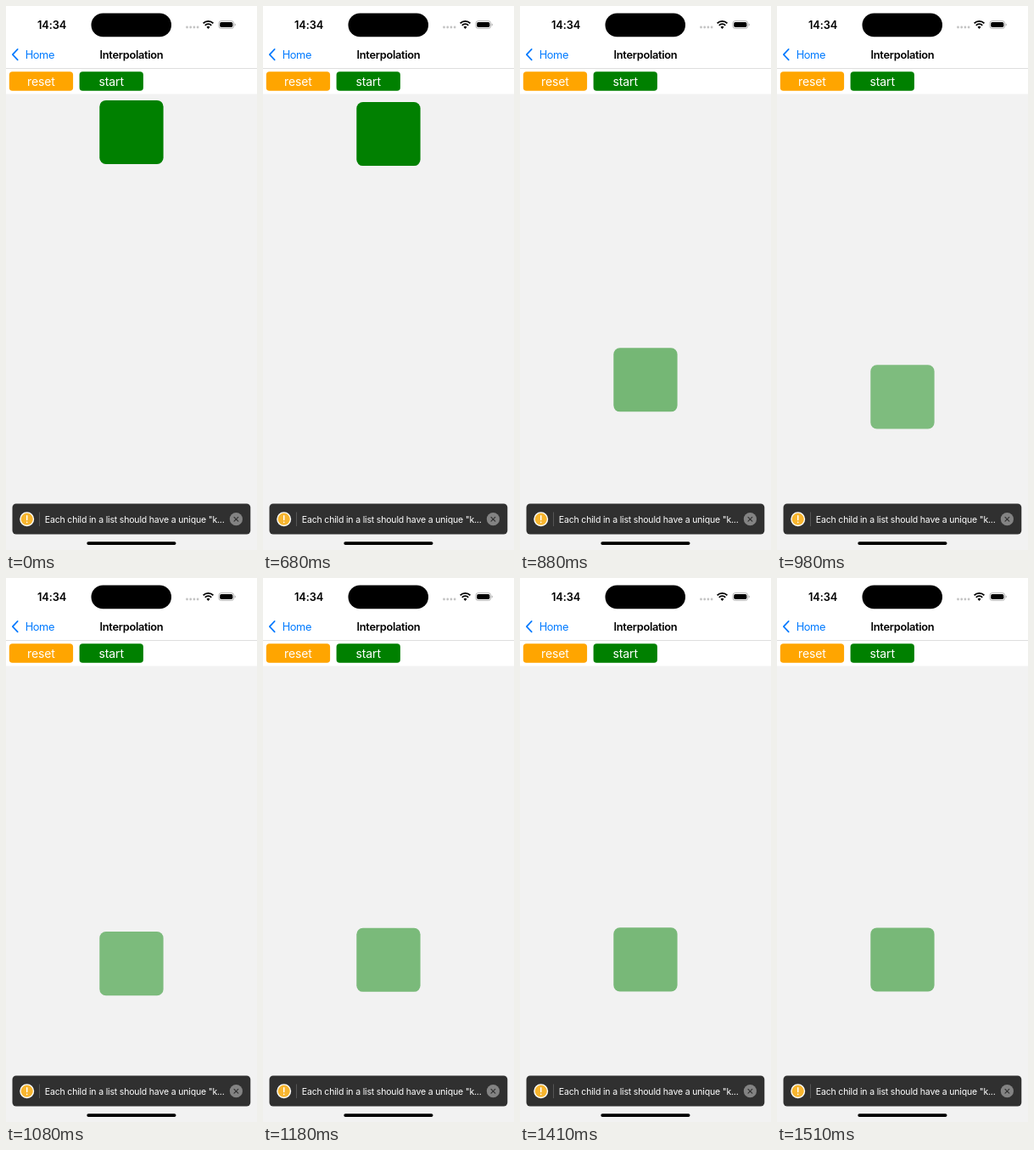
Write an HTML page that moves like this. It is 296 by 640 pixels and loops after 3050 ms.

```html
<!DOCTYPE html>
<html lang="en">
<head>
<meta charset="utf-8">
<title>Interpolation</title>
<style>
  html, body { margin: 0; width: 100%; height: 100%; overflow: hidden; background: #f2f2f2; }
  svg { display: block; width: 296px; height: 640px; }
  text { font-family: Inter, "Liberation Sans", sans-serif; }
  .time { font-size: 12.8px; font-weight: 600; letter-spacing: -.1px; }
  .title { font-size: 12.8px; font-weight: 600; letter-spacing: -.28px; text-anchor: middle; }
  .back { font-size: 12.8px; letter-spacing: -.4px; fill: #007aff; }
  .label { font-size: 14px; letter-spacing: -.1px; text-anchor: middle; fill: #fff; }
  .toast { font-size: 10.5px; letter-spacing: -.17px; fill: #fff; }
  .line { fill: none; stroke-linecap: round; stroke-linejoin: round; }
</style>
</head>
<body>
<svg viewBox="0 0 296 640">
  <rect width="296" height="640" fill="#f2f2f2"/>
  <rect width="296" height="103.5" fill="#fff"/>
  <rect y="73" width="296" height="1" fill="#dedede"/>

  <!-- status bar -->
  <text class="time" x="37" y="26.5">14:34</text>
  <rect x="100.5" y="8.5" width="94.5" height="27.8" rx="13.9"/>
  <g fill="#c4c4c4">
    <circle cx="213.5" cy="25" r="1.4"/><circle cx="217.7" cy="25" r="1.4"/>
    <circle cx="221.9" cy="25" r="1.4"/><circle cx="226.1" cy="25" r="1.4"/>
  </g>
  <g fill="none" stroke="#000" stroke-width="1.8">
    <path d="M232.6 20.3a8.2 8.2 0 0 1 11.8 0"/>
    <path d="M234.8 22.8a5.1 5.1 0 0 1 7.4 0"/>
  </g>
  <path d="M238.5 26.9l-2-2.1a2.9 2.9 0 0 1 4 0z"/>
  <rect x="250.9" y="17.6" width="17.8" height="8.8" rx="2.8" fill="none" stroke="#a3a3a3" stroke-width=".8"/>
  <rect x="252.2" y="18.9" width="15.2" height="6.2" rx="1.8"/>
  <path d="M269.7 20.5a1.6 1.6 0 0 1 0 3z" fill="#a3a3a3"/>

  <!-- navigation -->
  <path class="line" d="M13.7 50.8L7.8 57.1l5.9 6.3" stroke="#007aff" stroke-width="1.7"/>
  <text class="back" x="22.7" y="61.5">Home</text>
  <text class="title" x="148" y="61.5">Interpolation</text>

  <!-- buttons -->
  <rect x="3.8" y="77.2" width="75.3" height="22.6" rx="3.8" fill="#ffa500"/>
  <text class="label" x="41.4" y="93.7">reset</text>
  <rect x="86.6" y="77.2" width="75.3" height="22.6" rx="3.8" fill="#008000"/>
  <text class="label" x="124.2" y="93.7">start</text>

  <rect id="box" x="110.3" y="110.9" width="75.3" height="75.1" rx="7.5" fill="#008000"/>

  <!-- warning -->
  <rect x="7.5" y="585.5" width="280.8" height="36" rx="4.5" fill="#303030"/>
  <circle cx="24.7" cy="603.7" r="8.5" fill="#fff"/>
  <circle cx="24.7" cy="603.7" r="7.1" fill="#f7b52f"/>
  <path class="line" d="M24.7 599.8v4.6M24.7 607.3v.1" stroke="#fff" stroke-width="1.5"/>
  <rect x="39" y="595.5" width="1" height="16.5" fill="#565656"/>
  <text class="toast" x="45.8" y="607.5">Each child in a list should have a unique "k...</text>
  <circle cx="271.4" cy="603.7" r="7.6" fill="#838383"/>
  <path class="line" d="M269 601.3l4.8 4.8m0-4.8l-4.8 4.8" stroke="#303030" stroke-width="1.1"/>

  <rect x="95.3" y="630.2" width="105.2" height="3.8" rx="1.9"/>
</svg>
<script>
  const LOOP = 3050, RELEASE = 672, TRAVEL = 300.5;
  const SAMPLES = [680, 780, 880, 980, 1080, 1180, 1300, 1410, 1510];
  const STIFFNESS = 230.2, DAMPING = 22;
  const box = document.getElementById('box');
  const start = performance.now();

  // Underdamped spring from 0 to 1, t in seconds
  function spring(t) {
    const decay = DAMPING / 2;
    const freq = Math.sqrt(STIFFNESS - decay * decay);
    return 1 - Math.exp(-decay * t) * (Math.cos(freq * t) + decay / freq * Math.sin(freq * t));
  }

  function draw() {
    const now = (performance.now() - start) % LOOP;
    const at = SAMPLES.filter(s => s <= now).pop();
    const p = at ? spring((at - RELEASE) / 1000) : 0;
    box.setAttribute('transform', `translate(0 ${(p * TRAVEL).toFixed(2)})`);
    box.setAttribute('opacity', (1 - p / 2).toFixed(3));
    requestAnimationFrame(draw);
  }
  draw();
</script>
</body>
</html>
```
